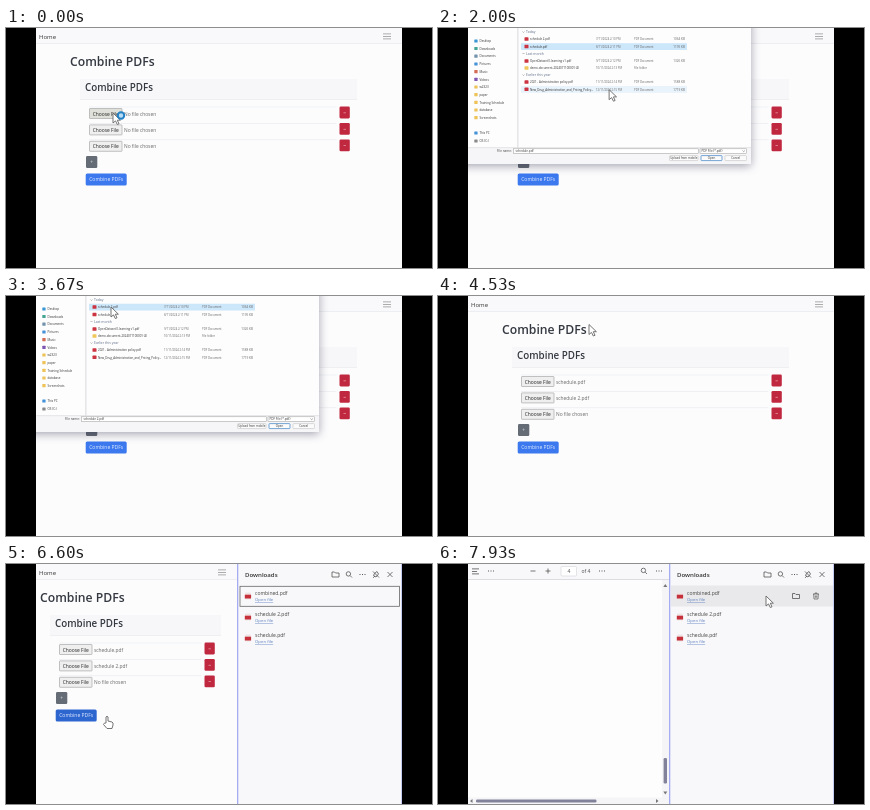
Animation, 426 px wide and 240 px high, one loop 8 s. Source, as an HTML page:

```html
<!DOCTYPE html>
<html lang="en">
<head>
<meta charset="utf-8">
<title>Combine PDFs</title>
<style>
  html, body { margin: 0; width: 100%; height: 100%; overflow: hidden; background: #000; }
  svg { display: block; width: 100vw; height: 100vh; }
  text { font-family: "Open Sans", "Noto Sans", sans-serif; white-space: pre; }
  .dialog { filter: drop-shadow(0 2px 5px rgba(30, 30, 60, .4)); }
</style>
</head>
<body>
<svg id="stage" viewBox="0 0 426 240"></svg>
<script>
const LOOP = 8000, STEP = 200 / 3;
const stage = document.getElementById('stage');

const rect = (x, y, w, h, fill, extra = '') =>
  `<rect x="${x}" y="${y}" width="${w}" height="${h}" fill="${fill}" ${extra}/>`;
const text = (x, y, size, str, fill = '#555', extra = '') =>
  `<text x="${x}" y="${y}" font-size="${size}" fill="${fill}" ${extra}>${str}</text>`;
const path = (d, stroke = '#555', width = 0.8, fill = 'none') =>
  `<path d="${d}" stroke="${stroke}" stroke-width="${width}" fill="${fill}"/>`;
const at = (x, y, content) => `<g transform="translate(${x} ${y})">${content}</g>`;
const bold = 'font-weight="600"', middle = 'text-anchor="middle"', end = 'text-anchor="end"';

const dots = (x, y) => [-2.5, 0, 2.5].map(d => rect(x + d - 0.5, y - 0.5, 1, 1, '#555')).join('');
const search = (x, y) => at(x, y, path('M1.2 1.2L3 3M1.6 -.6a2.2 2.2 0 1 1-4.4 0a2.2 2.2 0 1 1 4.4 0'));
const folder = (x, y) => at(x, y, path('M-3.5 2.5V-2.5H-1L0 -1.5H3.5V2.5Z'));
const trash = (x, y) => at(x, y, path('M-3 -2H3M-1 -2V-3H1V-2M-2.3 -2L-2 3H2L2.3 -2M-.6 -.5V1.7M.7 -.5V1.7', '#555', 0.7));

// Cursor waypoints: time, x, y of the tip.
const route = [
  [0, 107, 85], [700, 108, 86], [1100, 130, 23], [1250, 130, 23], [1650, 105, 18], [1850, 105, 18],
  [2200, 273, 129], [2350, 273, 129], [2800, 113, 102], [3150, 113, 102], [3550, 105, 11],
  [3750, 105, 11], [4050, 273, 129], [4200, 273, 129], [4500, 151, 28.5], [4700, 151, 28.5],
  [5300, 101, 152], [6650, 101, 152], [7000, 258, 35], [7200, 258, 35], [7800, 328, 32], [8000, 328, 32]
];

function cursorAt(t) {
  const i = route.findIndex(p => p[0] > t);
  const [t0, x0, y0] = route[i - 1], [t1, x1, y1] = route[i];
  const u = (t - t0) / (t1 - t0), e = u * u * (3 - 2 * u);
  return [x0 + (x1 - x0) * e, y0 + (y1 - y0) * e];
}

function cursor(t) {
  const [x, y] = cursorAt(t);
  if (t > 5150 && t < 6750) {
    return at(x, y, path('M-1 7V1Q0 -.6 1 1V5L5 6Q6.5 6.5 6 9L5 12.5H0L-3.5 8.5Q-3 6.5 -1 7Z', '#666', 0.9, '#fff'));
  }
  const arrow = path('M0 0V10L2.5 7.9L4.3 11.5L6 10.8L4.3 7.2H7.4Z', '#666', 0.9, '#fff');
  const busy = t < 600
    ? '<circle cx="8" cy="2.5" r="3.2" fill="#b9dcf5" stroke="#2381c4" stroke-width="2"/>' : '';
  return at(x, y, arrow + busy);
}

const isDialogOpen = t => (t >= 670 && t < 2350) || (t >= 3250 && t < 4200);

function webPage(t) {
  const narrow = t >= 5900;
  const dx = narrow ? -30 : 0, right = narrow ? 231 : 396;
  const cardRight = narrow ? 215 : 351, removeX = narrow ? 198.5 : 333.5;
  const files = [t >= 2350 && 'schedule.pdf', t >= 4200 && 'schedule 2.pdf', false];
  const [cx, cy] = cursorAt(t);

  let s = rect(30, 0, right - 30, 240, '#fcfcfd') + rect(30, 0, right - 30, 15.5, '#f9f9fb')
    + rect(30, 15, right - 30, 0.7, '#e9eaee')
    + text(33, 10.7, 6, 'Home', '#333');
  for (const y of [5.5, 8, 10.5]) s += rect(right - 19, y, 8, 0.8, '#999');
  s += text(64 + dx, 38, 12.2, 'Combine PDFs', '#343840', bold)
    + rect(74 + dx, 51, cardRight - 74 - dx, 20.5, '#f7f7f9')
    + rect(74 + dx, 71, cardRight - 74 - dx, 0.6, '#e9e9ed')
    + text(79 + dx, 63, 9.8, 'Combine PDFs', '#343840', bold);

  files.forEach((file, i) => {
    const y = 80 + i * 16.4;
    const hover = !isDialogOpen(t) && cx > 83 && cx < 116 && cy > y && cy < y + 11;
    s += rect(83 + dx, y - 1.3, removeX - 86 - dx, 0.6, '#e9eaee')
      + rect(83.5 + dx, y + 0.5, 32.5, 10, hover ? '#e0e0da' : '#efefef', 'stroke="#aaa" stroke-width=".7" rx=".5"')
      + text(99.8 + dx, y + 7.6, 4.9, 'Choose File', '#222', middle)
      + text(118 + dx, y + 7.6, 4.85, file || 'No file chosen', '#666')
      + rect(removeX, y - 1.4, 10.3, 11.8, '#c0283f', 'rx="1.3"')
      + rect(removeX + 4, y + 4.5, 2.4, 0.7, '#e9a3ad');
  });

  const pressed = t >= 5200;
  return s + rect(80 + dx, 128, 11.3, 12, '#656c76', 'rx="1.3"')
    + text(85.6 + dx, 135.8, 5, '+', '#ddd', middle)
    + rect(79.7 + dx, 145.5, 41, 12, pressed ? '#2e66d0' : '#3c78ee', 'rx="1.5"')
    + text(100.2 + dx, 153.4, 5, 'Combine PDFs', '#e6eeff', middle);
}

const places = [
  ['Desktop', 13, '#3997d3'], ['Downloads', 20.5, '#44a594'], ['Documents', 28.2, '#7393ad'],
  ['Pictures', 36, '#4492d8'], ['Music', 43.7, '#d46b55'], ['Videos', 51.3, '#8056b5'],
  ['w2323', 59, '#eec357'], ['paper', 66.7, '#eec357'], ['Training Schedule', 74.3, '#eec357'],
  ['database', 82, '#eec357'], ['Screenshots', 89.7, '#eec357'], ['This PC', 105, '#4492d8'], ['OS (C:)', 113, '#8a8a8a']
];
const documents = [
  ['schedule 2.pdf', 11], ['schedule.pdf', 18.5], ['OpenDataset E-learning v1.pdf', 33],
  ['demo-document-2024071100001 (4)', 40], ['2021 - Administration policy.pdf', 54],
  ['New_Drug_Administration_and_Pricing_Policy...', 61.3]
];

function fileDialog(t) {
  const [cx, cy] = cursorAt(t);
  const chosen = t >= 1700 && t < 2350 ? 'schedule.pdf' : t >= 3600 ? 'schedule 2.pdf' : '';
  let s = rect(20, -10, 293, 146, '#fdfdfd', 'class="dialog"') + rect(79.5, 0, 0.8, 120, '#d2d2d6')
    + rect(30, 119.5, 283, 16.5, '#f6f6f8') + rect(30, 119.5, 283, 0.6, '#d8d8dc');

  for (const [name, y, color] of places) {
    s += rect(36.3, y - 1.6, 3.3, 3.2, color, 'rx=".5"') + text(41.5, y + 1.2, 3, name, '#333');
  }
  for (const [label, y] of [['Today', 4], ['Last month', 25.5], ['Earlier this year', 47]]) {
    s += text(88, y + 1.2, 3.4, label, '#5f6d88') + path(`M84.5 ${y - .5}l1 1l1 -1`, '#777', 0.5);
  }
  documents.forEach(([name, y], i) => {
    if (name === chosen || (cx > 84 && cx < 252 && Math.abs(cy - y) < 3.5)) {
      s += rect(83, y - 3.3, 166, 6.8, name === chosen ? '#cce6fa' : '#e8f3fb');
    }
    const folderRow = i === 3;
    s += rect(86.5, y - 1.7, 4, 3.5, folderRow ? '#efc75b' : '#cb3440', 'rx=".6"')
      + text(92, y + 1.2, 2.9, name, '#333')
      + text(158, y + 1.2, 2.8, `${7 + i}/11/2024 2:1${i} PM`, '#666')
      + text(196, y + 1.2, 2.8, folderRow ? 'File folder' : 'PDF Document', '#666')
      + (folderRow ? '' : text(247, y + 1.2, 3.1, `${1064 + i * 131} KB`, '#666', end));
  });

  s += text(59, 124.4, 3.1, 'File name:', '#444')
    + rect(75.5, 120.8, 185, 4.7, '#fff', 'stroke="#999" stroke-width=".5"')
    + text(77.5, 124.3, 3, chosen, '#333')
    + rect(262, 120.8, 46.5, 4.7, '#fff', 'stroke="#999" stroke-width=".5"')
    + text(263.5, 124.3, 3, 'PDF File (*.pdf)', '#333')
    + path('M304.5 122.5l1.2 1.2l1.2 -1.2', '#555', 0.5);
  const button = (x, w, label, border) =>
    rect(x, 127.6, w, 5, '#fbfbfb', `stroke="${border}" stroke-width=".7" rx=".7"`)
    + text(x + w / 2, 131.3, 2.9, label, '#333', middle);
  return s + button(231.5, 28.5, 'Upload from mobile', '#ccc')
    + button(263, 21, 'Open', '#3d82c4') + button(287, 21.5, 'Cancel', '#ccc');
}

function downloads(t) {
  const hover = t >= 6930;
  let s = rect(231, 0, 165, 240, '#f8f8fa') + rect(231, 0, 1.3, 240, '#a3adf0') + rect(395, 0, 1, 240, '#c5ccf4')
    + text(239, 13, 6.1, 'Downloads', '#333', bold)
    + folder(329.5, 10.5) + search(343, 10.5) + dots(356.5, 10.5)
    + at(370, 10.5, path('M-3 -3L3 3M-2.5 1L0 2.5L2.5 -.5L1 -3L-1.5 -1Z M-1 1.5L-3 3.3'))
    + at(384, 10.5, path('M-2.5 -2.5L2.5 2.5M2.5 -2.5L-2.5 2.5'));
  s += hover ? rect(233, 21.5, 162, 21, '#e9e9eb')
    : rect(234, 22.3, 159.5, 20, '#f8f8fa', 'stroke="#666" stroke-width=".8"');
  ['combined.pdf', 'schedule 2.pdf', 'schedule.pdf'].forEach((name, i) => {
    const y = 32 + i * 21;
    s += rect(239.2, y - 3.5, 5.6, 7, '#eee3e3', 'rx=".5"') + rect(238.8, y - 1.3, 6.3, 3.8, '#c5303b')
      + text(249, y - 1, 5, name, '#444')
      + text(249, y + 5.2, 4.3, 'Open file', '#5a7fc0', 'text-decoration="underline"');
  });
  return s + (hover ? folder(358, 32) + trash(378, 32) : '');
}

function viewer(t) {
  const u = Math.min(1, Math.max(0, (t - 7250) / 550));
  let s = rect(30, 0, 201, 240, '#fdfdfe') + rect(30, 0, 201, 15.5, '#f8f8fa') + rect(30, 15.2, 201, 0.8, '#d5d6de');
  for (const y of [4.5, 7, 9.5]) s += rect(34, y, y === 7 ? 5 : 7, 0.8, '#555');
  s += dots(53, 7) + rect(92.5, 6.6, 5, 0.8, '#555')
    + path('M107.5 7H112.5M110 4.5V9.5')
    + rect(123, 2.5, 15.5, 9.5, '#fff', 'stroke="#d4d4da" stroke-width=".6" rx="1"')
    + text(131, 9, 5, 1 + Math.floor(u * 3), '#444', middle)
    + text(143.5, 9, 5, 'of 4', '#444') + dots(164, 7) + search(206, 7) + dots(221, 7);
  return s + rect(224, 16, 7, 224, '#f5f5f7') + rect(30, 233.5, 201, 6.5, '#f5f5f7')
    + path('M225.3 23L227.3 20L229.3 23Z M225.3 227.5L227.3 230.5L229.3 227.5Z M34.5 235L32 237L34.5 239Z M218 235L220.5 237L218 239Z', 'none', 0, '#777')
    + rect(225.6, 27 + u * 167, 3.4, 25.5, '#82839a', 'rx="1.2"')
    + rect(38, 235.5, 120.5, 3, '#82839a', 'rx="1.2"');
}

function draw(t) {
  let s = rect(0, 0, 426, 240, '#000');
  s += t >= 7200 ? viewer(t) : webPage(t);
  if (isDialogOpen(t)) s += fileDialog(t);
  if (t >= 5900) s += downloads(t);
  stage.innerHTML = s + rect(0, 0, 30, 240, '#000') + rect(396, 0, 30, 240, '#000') + cursor(t);
}

let shown = -1;
function tick() {
  const step = Math.floor(((performance.now() % LOOP) + 4) / STEP) % 120;
  if (step !== shown) draw((shown = step) * STEP);
  requestAnimationFrame(tick);
}
tick();
</script>
</body>
</html>
```
